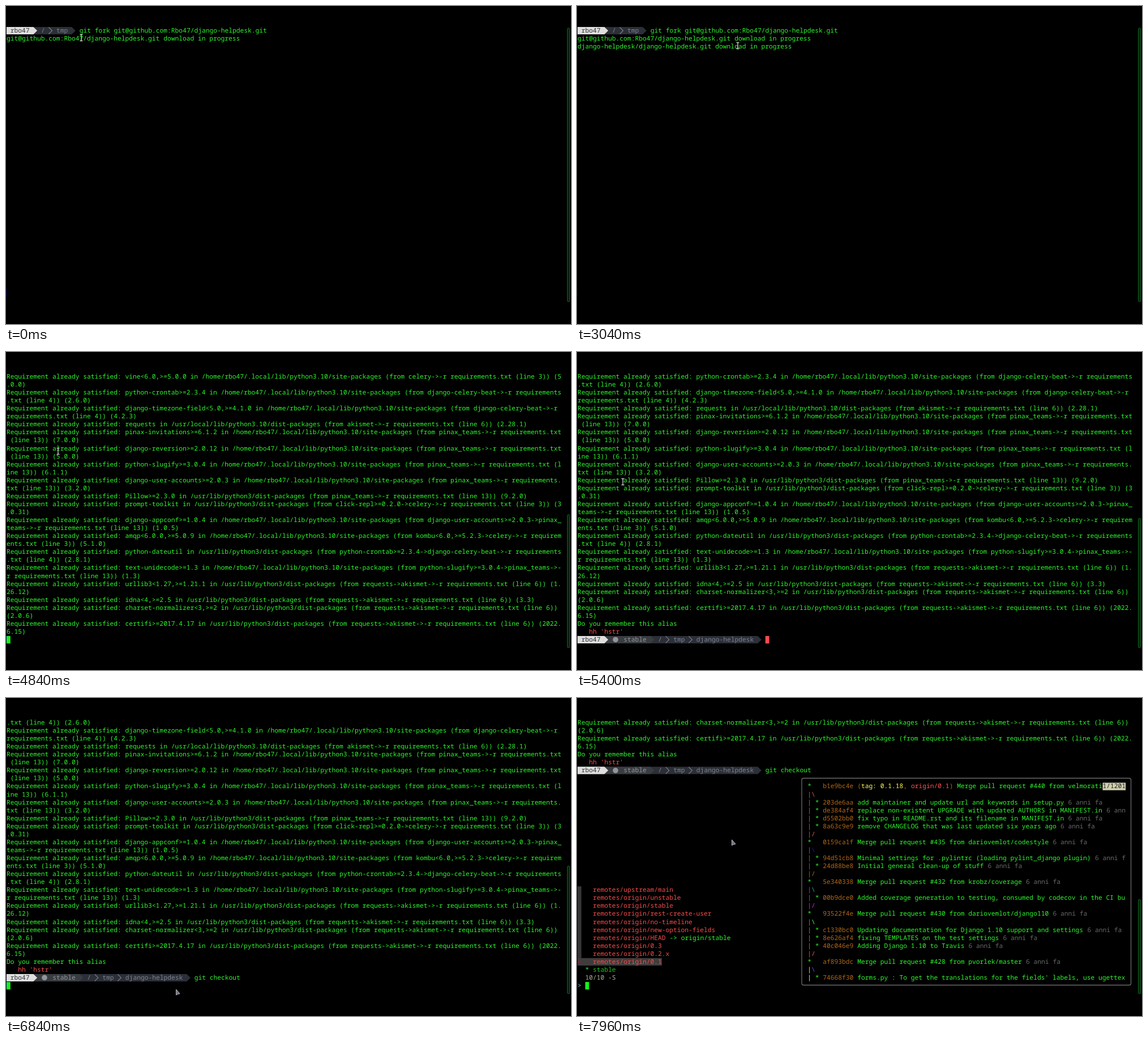
These frames come from a looping animation (998x561 px, 8 s). An HTML page:

```html
<!DOCTYPE html>
<html lang="en">
<head>
<meta charset="utf-8">
<title>Terminal session</title>
<style>
html, body { margin: 0; width: 100%; height: 100%; overflow: hidden; background: #000; }
svg { display: block; width: 100%; height: 100%; }
text {
  font: 500 11.283px "Noto Sans Mono", "DejaVu Sans Mono", monospace;
  white-space: pre;
  text-rendering: geometricPrecision;
}
</style>
</head>
<body>
<svg viewBox="0 0 998 561">
  <rect width="998" height="561"/>
  <rect y="500" width="1" height="12" fill="#00005c"/>
  <g id="screen"></g>
  <rect id="thumb" x="991.5" width="4" rx="1.5" fill="#05200b" stroke="#0e6420"/>
  <g id="pointer">
    <path id="beam" d="M-2.5-5.5H2.5M0-5.5V5.5M-2.5 5.5H2.5" fill="none" stroke="#c4c4c4" stroke-width="1.4"/>
    <path id="arrow" d="M-2.5-5V5L0 3.6 4 2.6Z" fill="#70707a" stroke="#c0c0c8" stroke-width=".9"/>
  </g>
</svg>
<script>
const LOOP = 8000, ROWS = 34, COLS = 145, CELL = 6.77, LINE = 14.06;
const GREEN = '#2cf82c', RED = '#fa4b4b', BROWN = '#b26818', GREY = '#686868';
const USER = 'rbo47', REPO = 'django-helpdesk';
const $ = id => document.getElementById(id);
const X = col => 1 + col * CELL;
const Y = row => 47 + row * LINE;
const esc = s => s.replace(/&/g, '&amp;').replace(/</g, '&lt;').replace(/>/g, '&gt;');

const put = (row, col, str, fill = GREEN) =>
  `<text x="${X(col).toFixed(2)}" y="${Y(row).toFixed(2)}" fill="${fill}">${esc(str)}</text>`;
const block = (row, col, width, fill) =>
  `<rect x="${X(col)}" y="${Y(row) - 10}" width="${width * CELL}" height="13.2" fill="${fill}"/>`;

// Powerline prompt
function segment(row, col, fill) {
  const top = Y(row) - 10, x = X(col);
  return `<path d="M1 ${top}H${x}L${x + CELL} ${top + 6.5} ${x} ${top + 13}H1Z" fill="${fill}"/>`;
}
function chevron(row, col) {
  const top = Y(row) - 9.5, x = X(col);
  return `<path d="M${x} ${top}l6 6-6 6" fill="none" stroke="#80848a" stroke-width="1.1"/>`;
}
function prompt(row, dirs, branch) {
  const start = branch ? 21 : 9;
  let col = start, path = '';
  dirs.forEach((dir, i) => {
    if (i) { path += chevron(row, col); col += 2; }
    path += put(row, col, dir, '#7c828c');
    col += dir.length + 1;
  });
  let out = segment(row, col, '#2c2f38') + path;
  if (branch) {
    out += segment(row, 19, '#393d41') + put(row, 12, branch, '#92969a') +
      `<circle cx="${X(9.9)}" cy="${Y(row) - 3.5}" r="4.8" fill="#92969a"/>`;
  }
  return out + segment(row, 7, '#dedede') + put(row, 1, USER, '#34343c');
}

// Installer output: spec, install place, parents, line, version
const PLACES = {
  L: `/home/${USER}/.local/lib/python3.10/site-packages`,
  D: '/usr/local/lib/python3.10/dist-packages',
  U: '/usr/lib/python3/dist-packages'
};
const PACKAGES = `Django>=2.2,<4 L - 1 3.2.15
django-bootstrap4-form L - 2 1.0.2
celery L - 3 5.2.7
django-celery-beat L - 4 2.3.0
email-reply-parser L - 5 0.5.12
akismet L - 6 1.1
markdown U - 7 3.4.1
beautifulsoup4 U - 8 4.11.1
lxml U - 9 4.9.1
simplejson U - 10 3.17.6
pytz U - 11 2022.2
six U - 12 1.16.0
pinax_teams L - 13 2.0.4
djangorestframework L - 14 3.13
django-model-utils L - 15 4.2
django-cleanup L - 16 6.0.0
asgiref<4,>=3.3.2 L Django>=2.2,<4 1 3.5.2
sqlparse>=0.2.2 U Django>=2.2,<4 1 0.4.2
soupsieve>1.2 U beautifulsoup4 8 2.3.2
kombu<6.0,>=5.2.3 L celery 3 5.2.4
billiard<4.0,>=3.6.4.0 L celery 3 3.6.4.0
click-didyoumean>=0.0.3 L celery 3 0.3.0
click-repl>=0.2.0 L celery 3 0.2.0
click-plugins>=1.1.1 L celery 3 1.1.1
click<9.0,>=8.0.3 U celery 3 8.0.3
vine<6.0,>=5.0.0 L celery 3 5.0.0
python-crontab>=2.3.4 L django-celery-beat 4 2.6.0
django-timezone-field<5.0,>=4.1.0 L django-celery-beat 4 4.2.3
requests D akismet 6 2.28.1
pinax-invitations>=6.1.2 L pinax_teams 13 7.0.0
django-reversion>=2.0.12 L pinax_teams 13 5.0.0
python-slugify>=3.0.4 L pinax_teams 13 6.1.1
django-user-accounts>=2.0.3 L pinax_teams 13 3.2.0
Pillow>=2.3.0 U pinax_teams 13 9.2.0
prompt-toolkit U click-repl>=0.2.0->celery 3 3.0.31
django-appconf>=1.0.4 L django-user-accounts>=2.0.3->pinax_teams 13 1.0.5
amqp<6.0.0,>=5.0.9 L kombu<6.0,>=5.2.3->celery 3 5.1.0
python-dateutil U python-crontab>=2.3.4->django-celery-beat 4 2.8.1
text-unidecode>=1.3 L python-slugify>=3.0.4->pinax_teams 13 1.3
urllib3<1.27,>=1.21.1 U requests->akismet 6 1.26.12
idna<4,>=2.5 U requests->akismet 6 3.3
charset-normalizer<3,>=2 U requests->akismet 6 2.0.6
certifi>=2017.4.17 U requests->akismet 6 2022.6.15`;

const plain = (str, col = 0, fill = GREEN) => row => put(row, col, str, fill);
const address = `git@github.com:Rbo47/${REPO}.git`;
const log = [
  row => prompt(row, ['/', 'tmp']) + put(row, 19, `git fork ${address}`),
  plain(`${address} download in progress`),
  plain(`${REPO}/${REPO}.git download in progress`),
  plain('Defaulting to user installation because normal site-packages is not writeable')
];
for (const entry of PACKAGES.split('\n')) {
  const [spec, place, via, line, version] = entry.split(' ');
  const from = via === '-' ? '' : via + '->';
  const str = `Requirement already satisfied: ${spec} in ${PLACES[place]} ` +
    `(from ${from}-r requirements.txt (line ${line})) (${version})`;
  for (let i = 0; i < str.length; i += COLS) log.push(plain(str.slice(i, i + COLS)));
}
const INSTALLED = log.length;
log.push(plain('Do you remember this alias'), plain("hh 'hstr'", 3, RED));

// Branch picker
const BRANCHES = ['upstream/main', 'origin/unstable', 'origin/stable', 'origin/rest-create-user',
  'origin/no-timeline', 'origin/new-option-fields', 'origin/HEAD', 'origin/0.3', 'origin/0.2.x', 'origin/0.1'];
const MERGES = [
  [RED, RED, 'b1e9bc4e', '440 from velmorati', [
    '203de6aa add maintainer and update url and keywords in setup.py',
    'de384af4 replace non-existent UPGRADE with updated AUTHORS in MANIFEST.in',
    'd5502bb0 fix typo in README.rst and its filename in MANIFEST.in',
    '8a63c9e9 remove CHANGELOG that was last updated six years ago']],
  [BROWN, '#1818b2', '0159ca1f', '435 from dariovemlot/codestyle', [
    '94d51cb8 Minimal settings for .pylintrc (loading pylint_django plugin)',
    '24d88be8 Initial general clean-up of stuff']],
  ['#e11ee1', '#18b2b2', '5e340338', '432 from krobz/coverage', [
    '00b9dce0 Added coverage generation to testing, consumed by codecov in the CI build']],
  ['#ff5454', '#54ff54', '93522f4e', '430 from dariovemlot/django110', [
    'c1330bc0 Updating documentation for Django 1.10 support and settings',
    '8e626af4 fixing TEMPLATES on the test settings',
    '40c046e9 Adding Django 1.10 to Travis']],
  ['#ffff54', '#5454ff', 'af893bdc', '428 from pvorlek/master', [
    "74668f30 forms.py : To get the translations for the fields' labels, use ugettext"]]
];

function commit(row, hash, msg, tagged) {
  const start = tagged ? 99 : 73, end = start + msg.length + 1;
  return put(row, 64, hash, BROWN) + put(row, start, msg.slice(0, 143 - start)) +
    (end < 143 && !tagged ? put(row, end, '6 anni fa'.slice(0, 143 - end), GREY) : '');
}

function preview() {
  let row = 8, out = '';
  MERGES.forEach(([lane, side, hash, title, commits], i) => {
    out += put(row, 60, '*') + commit(row++, hash, 'Merge pull request #' + title, i === 0);
    out += put(row, 60, '|', lane) + put(row++, 61, '\\', side);
    for (const c of commits) {
      out += put(row, 60, '|', lane) + put(row, 62, '*') + commit(row++, c.slice(0, 8), c.slice(9));
    }
    if (row < 32) out += put(row++, 60, '|/', lane);
  });
  return out + put(8, 73, '(', BROWN) + put(8, 74, 'tag: 0.1.18', '#ffff54') + put(8, 85, ',', BROWN) +
    put(8, 87, 'origin/0.1', '#ff5454') + put(8, 97, ')', BROWN) +
    block(8, 137, 6, '#cfcfae') + put(8, 137, '1/1201', '#202020');
}

function picker(loaded) {
  let out = `<rect x="1" y="${Y(21) - 10}" width="${CELL}" height="${LINE * 10 - 1}" fill="#363636"/>` +
    block(30, 0, 22, '#403c3c') + put(30, 0, '>', '#a02038');
  BRANCHES.forEach((name, i) => {
    out += put(21 + i, 4, 'remotes/' + name, RED);
    if (name.endsWith('HEAD')) out += put(21 + i, 24, '-> origin/stable');
  });
  out += put(31, 2, '*') + put(31, 4, 'stable', '#18c818') + put(32, 2, '10/10 -S', '#afaf97') + put(33, 0, '>', '#87afd7');
  out += '<rect x="397" y="141.5" width="581.5" height="365" rx="3" fill="none" stroke="#6a6a6a" stroke-width="1.3"/>';
  return out + (loaded ? preview() : '');
}

// Key times in ms
const SECOND = 2400, INSTALL = 4220, DONE = 4780, READY = 5160, TYPE = 5720, STROKE = 70, ENTER = 6800, PICK = 7240, LOADED = 7340;
const COMMAND = 'git checkout';

function draw(t) {
  const typed = COMMAND.slice(0, Math.max(0, Math.floor((t - TYPE) / STROKE) + 1));
  let shown = t < SECOND ? 2 : 3;
  if (t >= INSTALL) shown += Math.floor(Math.min(1, (t - INSTALL) / (DONE - INSTALL)) * (INSTALLED - 3));
  const lines = t < READY ? log.slice(0, shown) : log.concat(row =>
    prompt(row, ['/', 'tmp', REPO], 'stable') + put(row, 49, typed));

  const inPrompt = t >= READY && t < ENTER;
  const total = lines.length + (inPrompt ? 0 : 1) + (t >= PICK ? 26 : 0);
  const first = Math.max(0, total - ROWS);
  let out = lines.slice(first, first + ROWS).map((line, row) => line(row)).join('');
  if (t >= PICK) out += picker(t >= LOADED);

  // The cursor restarts its blink after every bit of activity
  const lastKey = TYPE + STROKE * (COMMAND.length - 1);
  let active = t < SECOND ? -860 : SECOND;
  if (t >= INSTALL) active = Math.min(t, DONE);
  if (t >= READY) active = READY;
  if (t >= TYPE) active = Math.min(t, lastKey);
  if (t >= ENTER) active = ENTER;
  if (t >= PICK) active = LOADED + 200;
  if (t < active || (t - active) % 1000 < 500) {
    const row = Math.min(ROWS - 1, total - 1);
    const col = t >= PICK ? 2 : inPrompt ? 49 + typed.length : 0;
    out += block(row, col, 1, inPrompt && !typed ? RED : '#18f018');
  }
  return { out, top: 39 + 482 * first / total };
}

const TRAIL = [[0, 133, 56], [1280, 429, 54], [3040, 284, 70], [4840, 92, 175], [5400, 81, 229],
  [6840, 303, 519], [7960, 276, 255], [LOOP, 276, 255]];
function pointerAt(t) {
  const i = TRAIL.findIndex(k => k[0] > t);
  const [t0, x0, y0] = TRAIL[i - 1], [t1, x1, y1] = TRAIL[i];
  const p = (t - t0) / (t1 - t0), e = p * p * (3 - 2 * p);
  return [x0 + (x1 - x0) * e, y0 + (y1 - y0) * e];
}

let last = '';
function render(t) {
  const { out, top } = draw(t);
  if (out !== last) $('screen').innerHTML = last = out;
  $('thumb').setAttribute('y', top);
  $('thumb').setAttribute('height', 521.5 - top);
  $('pointer').setAttribute('transform', `translate(${pointerAt(t)})`);
  $('beam').style.display = t < ENTER ? '' : 'none';
  $('arrow').style.display = t < ENTER ? 'none' : '';
}

const begin = performance.now();
function tick() {
  render((performance.now() - begin) % LOOP);
  requestAnimationFrame(tick);
}
tick();
</script>
</body>
</html>
```
